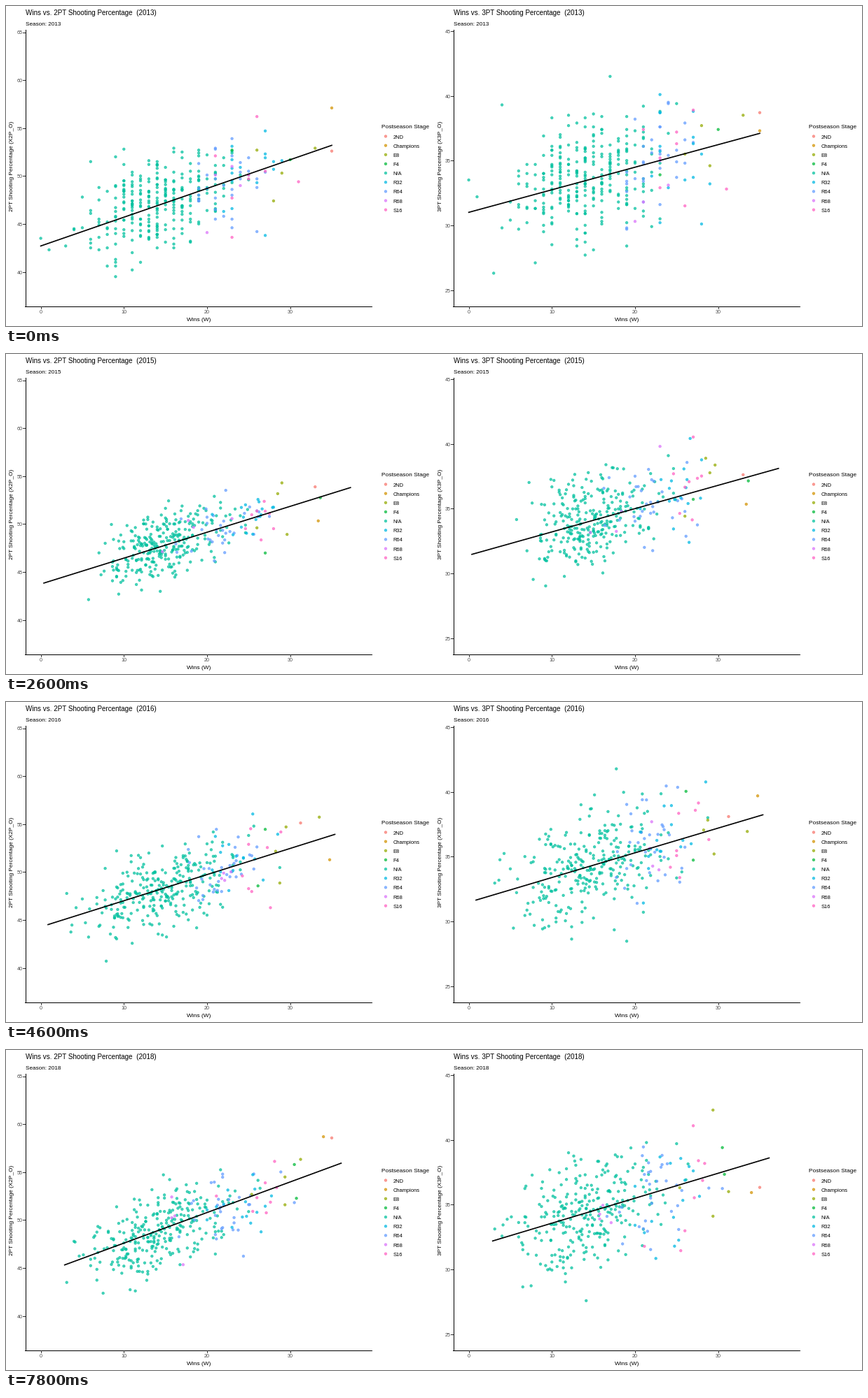
Recreate the animation shown at these times as a matplotlib script. Size 1222 by 458 pixels, loop 8 s.

```python
import numpy as np
import matplotlib.pyplot as plt
from matplotlib.animation import FuncAnimation

W, H, DPI = 1222, 458, 64
PX = 72 / DPI                     # points per pixel
FRAMES, INTERVAL, STEP = 40, 200, 8

plt.rcParams["font.family"] = "Liberation Sans"

# stage: colour, team count, mean wins, spread of wins
STAGES = {
    "2ND": ("#F8766D", 1, 33, 2.5),
    "Champions": ("#D39200", 1, 34.5, 1.2),
    "E8": ("#93AA00", 4, 29, 3.0),
    "F4": ("#00BA38", 2, 30, 3.5),
    "N/A": ("#00C19F", 282, 14.4, 4.9),
    "R32": ("#00B9E3", 16, 24.5, 2.7),
    "R64": ("#619CFF", 32, 22, 2.9),
    "R68": ("#DB72FB", 4, 19.5, 3.0),
    "S16": ("#FF61C3", 8, 26.5, 2.4),
}
SPREAD = 2.4                      # of percentages around the trend

# trend line ends per season: wins, 2PT %, 3PT %
TREND = np.array([
    [(0, 42.7, 31.0), (35, 53.2, 37.1)],
    [(1, 44.9, 31.9), (36, 53.3, 37.6)],
    [(0, 43.2, 31.2), (38, 54.1, 38.4)],
    [(1, 44.7, 31.7), (35, 53.9, 38.2)],
    [(2, 44.7, 32.1), (37, 55.4, 38.6)],
    [(3, 45.4, 32.2), (36, 56.0, 38.6)],
])


def make_stage(rng, count, mean, spread):
    """Array of season x team x (wins, 2PT %, 3PT %)."""
    seasons = []
    for start, end in TREND:
        wins = rng.normal(mean, spread, count).round().clip(start[0], end[0])
        along = (wins - start[0]) / (end[0] - start[0])
        teams = start + along[:, None] * (end - start)
        teams[:, 1:] += rng.normal(0, SPREAD, (count, 2))
        seasons.append(teams.round(1))
    return np.array(seasons)


rng = np.random.default_rng(21)
ORDER = sorted(STAGES, key=lambda name: -STAGES[name][1])
TEAMS = np.concatenate([make_stage(rng, *STAGES[n][1:]) for n in ORDER], axis=1)
COLORS = [STAGES[n][0] for n in ORDER for _ in range(STAGES[n][1])]

fig = plt.figure(figsize=(W / DPI, H / DPI), dpi=DPI, facecolor="white")
ax = fig.add_axes([0, 0, 1, 1])
ax.set(xlim=(0, W), ylim=(H, 0))
ax.axis("off")


def label(x, y, text, size, color="black", **kw):
    return ax.text(x, y, text, fontsize=size * PX, color=color, **kw)


def rule(xs, ys, color="black", width=1.0, **kw):
    return ax.plot(xs, ys, color=color, lw=width * PX, **kw)[0]


def dots(xs, ys, colors):
    return ax.scatter(xs, ys, s=(3.5 * PX) ** 2, c=colors, alpha=0.7,
                      edgecolors="face", linewidths=0.8 * PX, zorder=2)


class Panel:
    def __init__(self, kind, left, base, base_y, unit):
        self.kind, self.name = kind, f"{kind}PT"
        self.zero, self.base, self.base_y, self.unit = left + 21.6, base, base_y, unit
        edge, floor = left - 0.5, 429.5
        rule([edge, edge], [34, floor + 0.5])
        rule([left - 1, left + 494], [floor, floor])
        for v in range(0, 31, 10):
            x = self.px(v)
            rule([x, x], [430, 433], "#333333")
            label(x, 440, str(v), 7.2, "#4D4D4D", ha="center")
        for v in range(base, base + 26, 5):
            y = self.py(v)
            if y > 34:
                rule([left - 4, left - 1], [y, y], "#333333")
                label(left - 4, y + 3, str(v), 7.2, "#4D4D4D", ha="right")
        label(left + 247, 451, "Wins (W)", 8.4, ha="center")
        label(left - 19, 229, f"{self.name} Shooting Percentage (X{kind}P_O)",
              8.2, rotation=90, ha="center", va="center")
        self.title = label(left, 13, "", 9.87)
        self.season = label(left, 28, "", 8.1)
        self.legend(left + 507.5)
        blank = np.zeros(len(COLORS))
        self.dots = dots(blank, blank, COLORS)
        self.line = rule([], [], width=1.7, zorder=3)

    def px(self, wins):
        return self.zero + 11.87 * wins

    def py(self, pct):
        return self.base_y - self.unit * (pct - self.base)

    def legend(self, x):
        label(x, 175, "Postseason Stage", 8.35)
        ys = 186.5 + 13.15 * np.arange(len(STAGES))
        dots(np.full(len(ys), x + 6.5), ys, [s[0] for s in STAGES.values()])
        for y, name in zip(ys, STAGES):
            label(x + 17, y + 3, name, 7.5)

    def place(self, data):
        return self.px(data[:, 0]), self.py(data[:, self.kind - 1])

    def show(self, teams, trend, year):
        self.dots.set_offsets(np.column_stack(self.place(teams)))
        self.line.set_data(*self.place(trend))
        self.title.set_text(f"Wins vs. {self.name} Shooting Percentage  ({year})")
        self.season.set_text(f"Season: {year}")


PANELS = [Panel(2, 28, 40, 380.5, 13.72), Panel(3, 639, 25, 406.5, 18.53)]


def draw(frame):
    season, part = divmod(frame, STEP)
    mix = part / STEP
    teams, trend = ((1 - mix) * a[season] + mix * a[season + 1]
                    for a in (TEAMS, TREND))
    year = 2013 + round(frame * 6 / 49)
    for panel in PANELS:
        panel.show(teams, trend, year)
    return []


anim = FuncAnimation(fig, draw, frames=FRAMES, interval=INTERVAL,
                     repeat=True, repeat_delay=0, blit=False)
plt.show()
```
